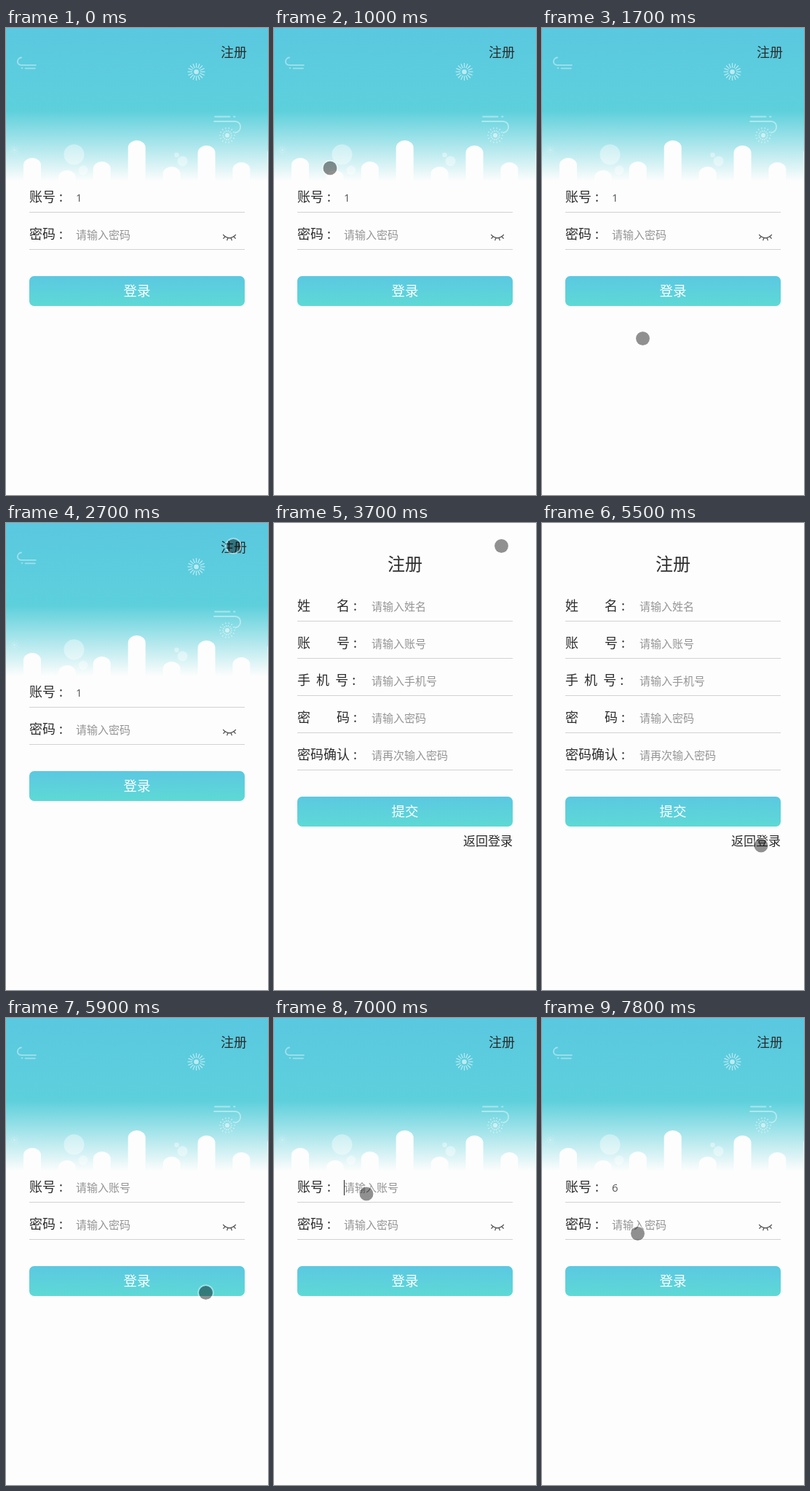
Write an HTML page that moves like this. It is 360x640 px and loops after 8 s.

```html
<!DOCTYPE html>
<html lang="zh-CN">
<head>
<meta charset="utf-8">
<style>
html, body { margin: 0; width: 100%; height: 100%; overflow: hidden; background: #fdfdfd; }
svg { display: block; width: 360px; height: 640px; }
text { font-family: "Noto Sans CJK SC", "Noto Sans CJK", "Noto Sans CJK JP", sans-serif; font-weight: 350; white-space: pre; }
.num { font-family: "Open Sans", "Noto Sans", sans-serif; font-weight: 400; }
</style>
</head>
<body>
<svg viewBox="0 0 360 640">
  <defs>
    <linearGradient id="sky" x1="0" y1="0" x2="0" y2="1">
      <stop offset="0" stop-color="#5ac8e0"/>
      <stop offset=".54" stop-color="#5dd0dc"/>
      <stop offset="1" stop-color="#fdfdfd"/>
    </linearGradient>
    <linearGradient id="btn" x1="0" y1="0" x2="0" y2="1">
      <stop offset="0" stop-color="#5bc8e2"/>
      <stop offset="1" stop-color="#5ed9d5"/>
    </linearGradient>
  </defs>
  <g id="login"></g>
  <g id="register"></g>
  <g id="cursor">
    <circle r="9.5" fill="#000" fill-opacity=".43"/>
    <circle r="10.4" fill="none" stroke="#fff" stroke-opacity=".4" stroke-width="1.8"/>
  </g>
</svg>
<script>
const $ = id => document.getElementById(id);

// Text placed by its left edge (or anchor) and vertical centre.
const text = (x, cy, size, str, fill = '#2c2c2c', extra = '') =>
  `<text x="${x}" y="${Math.round(cy + size * .35)}" font-size="${size}" fill="${fill}" ${extra}>${str}</text>`;
const mid = 'text-anchor="middle"';
const label = (cy, str) => text(32, cy, 18, str + '<tspan dx="5">:</tspan>');
const hint = (x, cy, str, extra) => text(x, cy, 15, str, '#959595', extra);
const rule = y => `<path d="M32 ${y + .5}H328" stroke="#d2d2d2"/>`;
const button = (y, str) =>
  `<rect x="32" y="${y}" width="296" height="41" rx="6.5" fill="url(#btn)"/>` +
  text(180, y + 20.5, 18.5, str, '#fff', mid);
const stroke = (d, color, width, opacity = 1) =>
  `<path d="${d}" fill="none" stroke="${color}" stroke-width="${width}" stroke-opacity="${opacity}" stroke-linecap="round"/>`;
const dot = (x, y, r, opacity = .4) => `<circle cx="${x}" cy="${y}" r="${r}" fill="#fff" opacity="${opacity}"/>`;
const bar = (top, i) => `<path d="M${24 + 47.9 * i} 210V${top + 10}a12 10 0 0 1 24 0V210z" fill="#fdfdfd"/>`;

function burst(x, y, r, rays, opacity, dash = '') {
  const ray = `<path d="M${r * .45} 0H${r}" stroke="#fff" stroke-width="1.2" stroke-dasharray="${dash}"/>`;
  const star = Array.from({length: rays}, (_, i) => `<g transform="rotate(${i * 360 / rays})">${ray}</g>`);
  return `<g transform="translate(${x} ${y})" opacity="${opacity}">${star.join('')}${dot(0, 0, r * .28, 1)}</g>`;
}

$('login').innerHTML =
  '<rect width="360" height="210" fill="url(#sky)"/>' +
  dot(93.5, 173.5, 14) + dot(106, 195, 6.5) + dot(242.5, 182.5, 7) + dot(234.5, 174, 3.3) +
  [178, 195, 183, 154, 190, 161, 184, 161].map(bar).join('') +
  burst(261.5, 60, 12, 16, .6) +
  burst(304, 147, 11, 14, .55, '2 2') +
  burst(11.5, 167, 7, 12, .25, '1.5 1.5') +
  stroke('M21 40.5C15 41 13.5 50.5 21 50.8H41M26.5 55.3H40M21.5 54.8h1', '#fff', 1.8, .42) +
  stroke('M287 121.5H307.5M313 121.5h1.5M286 128H315C324 128 325 142 315 143.5', '#fff', 1.8, .42) +
  text(295, 33.5, 18, '注册') +
  label(232, '账号') + rule(252) +
  hint(96, 232.5, '请输入账号', 'id="accountHint"') +
  text(96, 232.5, 15, '', '#555', 'class="num" id="account"') +
  label(283, '密码') + rule(303) +
  hint(96, 283.5, '请输入密码') +
  stroke('M298.5 283.5Q307 292 315.5 283.5M300.8 286.3l-2 2M304.8 287.8l-1 3M309.2 287.8l1 3M313.2 286.3l2 2', '#5c5c5c', 1.3) +
  button(340, '登录') +
  '<path id="caret" d="M96.5 222V243" stroke="#222"/>' +
  '<g id="list"><rect x="96.5" y="252.5" width="233" height="25" fill="#fff" stroke="#c4c4c4"/>' +
  '<rect id="hover" x="97" y="253" width="232" height="24" fill="#e8e8e8"/>' +
  text(100, 265, 14, '6', '#333', 'class="num"') + '</g>';

const fields = {
  '姓　　名': '请输入姓名',
  '账　　号': '请输入账号',
  '手  机  号': '请输入手机号',
  '密　　码': '请输入密码',
  '密码确认': '请再次输入密码'
};
$('register').innerHTML =
  text(180, 57, 24, '注册', '#2c2c2c', mid) +
  Object.entries(fields).map(([name, tip], i) => {
    const y = 114 + 51 * i;
    return label(y, name) + hint(134, y + 1, tip) + rule(y + 20);
  }).join('') +
  button(375, '提交') +
  text(260, 436.5, 17, '返回登录');

// Pointer moves: first and last step in ms, then the place reached.
const STEP = 100;
const moves = [
  [400, 700, 194, 96.5], [1000, 1000, 77, 192], [1100, 1100, 128, 490],
  [1500, 1700, 138.5, 425.5], [1900, 2200, 314, 42], [2700, 2700, 312.5, 31.5],
  [4200, 4500, 189, 448.5], [4600, 4800, 187.5, 429.5],
  [5000, 5000, 186.5, 491.5], [5100, 5500, 301, 442],
  [5900, 5900, 274.5, 376.5], [6000, 6200, 99.5, 223.5], [6300, 6600, 127, 241],
  [7400, 7800, 131.5, 295.5]
];
const smooth = p => p * p * (3 - 2 * p);

function pointer(t) {
  const now = Math.floor(t / STEP) * STEP;
  let x = 370, y = 20;
  for (const [start, end, toX, toY] of moves) {
    if (now < start) break;
    const p = smooth(Math.min(1, (now - start + STEP) / (end - start + STEP)));
    x += (toX - x) * p;
    y += (toY - y) * p;
  }
  return `translate(${x} ${y})`;
}

const show = (id, on) => $(id).setAttribute('visibility', on ? 'inherit' : 'hidden');

function draw(now) {
  const t = now % 8000;
  const within = (a, b) => t >= a && t < b;
  const registering = within(3700, 5900);
  show('register', registering);
  show('login', !registering);
  show('cursor', t >= 400 && !within(1100, 1500));
  $('cursor').setAttribute('transform', pointer(t));

  const value = t < 3700 ? '1' : t >= 7600 ? '6' : '';
  $('account').textContent = value;
  show('accountHint', !value);
  show('caret', within(7000, 7600));
  show('list', within(7300, 7600));
  show('hover', within(7500, 7600));
  requestAnimationFrame(draw);
}
requestAnimationFrame(draw);
</script>
</body>
</html>
```
